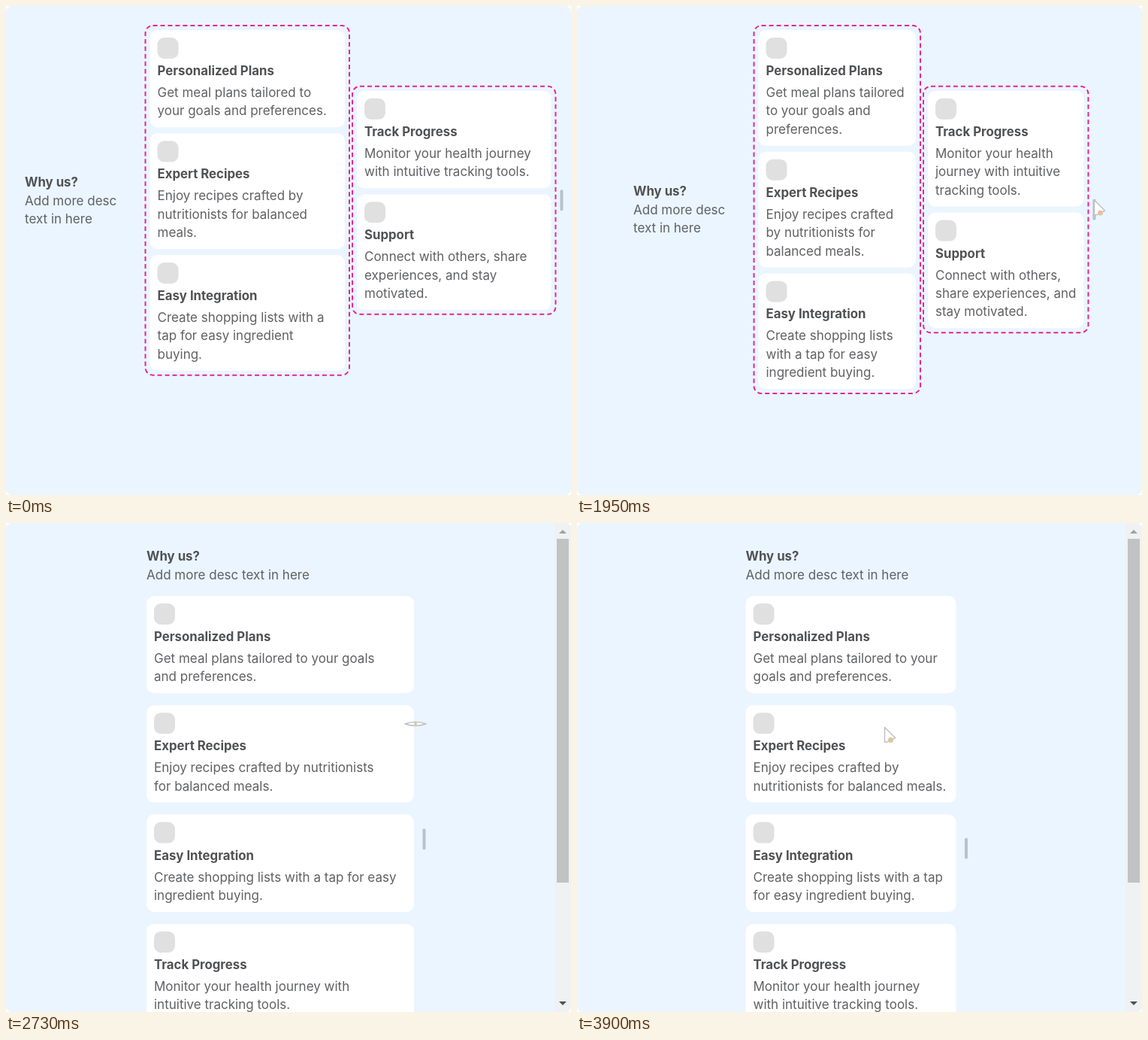
These frames come from a looping animation (752 px wide and 650 px high, 4.03 s). An HTML page:

```html
<!DOCTYPE html>
<html lang="en">
<head>
<meta charset="utf-8">
<title>Responsive cards</title>
<style>
  html, body { margin: 0; width: 100%; height: 100%; overflow: hidden; background: #fff; }
  svg { display: block; width: 752px; height: 650px; }
  text { font: 400 17px Inter, Roboto, sans-serif; fill: #606163; }
  .title { font-size: 16.8px; font-weight: 700; fill: #505153; }
  .card { fill: #fff; }
  .icon { fill: #e0e0e0; }
  .column { fill: none; stroke: #ec2390; stroke-width: 2; }
  .handle { fill: #b8c2cc; }
  .cursor { fill: #fff; stroke: #bfc1c3; stroke-width: 1.5; stroke-linejoin: round; }
  .dot { fill: #e3c3a3; stroke: none; }
</style>
</head>
<body>
<svg id="stage" viewBox="0 0 752 650" xmlns="http://www.w3.org/2000/svg"></svg>
<script>
const LOOP = 4030, LINE = 24.4, PAD = 10, ICON = 28;

// Each card: title, then [smallest text width, line breaks] from wide to narrow.
const CARDS = [
  ['Personalized Plans', [
    [300, 'Get meal plans tailored to your goals|and preferences.'],
    [251, 'Get meal plans tailored to your|goals and preferences.'],
    [225, 'Get meal plans tailored to|your goals and preferences.'],
    [209, 'Get meal plans tailored to|your goals and|preferences.'],
    [0, 'Get meal plans tailored|to your goals and|preferences.']]],
  ['Expert Recipes', [
    [306, 'Enjoy recipes crafted by nutritionists|for balanced meals.'],
    [258, 'Enjoy recipes crafted by|nutritionists for balanced meals.'],
    [202, 'Enjoy recipes crafted by|nutritionists for balanced|meals.'],
    [194, 'Enjoy recipes crafted by|nutritionists for|balanced meals.'],
    [0, 'Enjoy recipes crafted|by nutritionists for|balanced meals.']]],
  ['Easy Integration', [
    [325, 'Create shopping lists with a tap for easy|ingredient buying.'],
    [283, 'Create shopping lists with a tap for|easy ingredient buying.'],
    [253, 'Create shopping lists with a tap|for easy ingredient buying.'],
    [222, 'Create shopping lists with a|tap for easy ingredient|buying.'],
    [207, 'Create shopping lists with|a tap for easy ingredient|buying.'],
    [0, 'Create shopping lists|with a tap for easy|ingredient buying.']]],
  ['Track Progress', [
    [338, 'Monitor your health journey with intuitive|tracking tools.'],
    [263, 'Monitor your health journey with|intuitive tracking tools.'],
    [225, 'Monitor your health journey|with intuitive tracking tools.'],
    [0, 'Monitor your health|journey with intuitive|tracking tools.']]],
  ['Support', [
    [263, 'Connect with others, share|experiences, and stay motivated.'],
    [215, 'Connect with others, share|experiences, and stay|motivated.'],
    [0, 'Connect with others,|share experiences, and|stay motivated.']]]
];

// start, layout, left and right edge, cursor kind, cursor x, y
const STEPS = [
  [0, 'flow', 25, 732],
  [1040, 'flow', 25, 732, 'resize', 743, 265],
  [1300, 'flow', 31, 726, 'resize', 735, 264],
  [1430, 'flow', 41, 716, 'resize', 725, 264],
  [1690, 'flow', 51, 706, 'resize', 713, 264],
  [1820, 'flow', 63, 694, 'resize', 700, 262],
  [1950, 'flow', 75, 681, 'arrow', 688.5, 258],
  [2210, 'grid', 106, 644, 'resize', 650, 266],
  [2340, 'grid', 143, 607.5, 'resize', 616, 267],
  [2600, 'grid', 152, 598.5, 'resize', 580, 267],
  [2730, 'list', 187, 543, 'resize', 545, 267],
  [2860, 'list', 217, 512, 'resize', 522, 267],
  [2990, 'list', 224.5, 504.5, 'arrow', 517.5, 267],
  [3250, 'list', 224.5, 504.5, 'arrow', 510, 267],
  [3380, 'list', 224.5, 504.5, 'arrow', 499, 268],
  [3510, 'list', 224.5, 504.5, 'arrow', 486, 269],
  [3640, 'list', 224.5, 504.5, 'arrow', 471, 270],
  [3770, 'list', 224.5, 504.5, 'arrow', 448, 271],
  [3900, 'list', 224.5, 504.5, 'arrow', 409.5, 271.5]
];

const rect = (cls, x, y, w, h, r, extra = '') =>
  `<rect class="${cls}" x="${x}" y="${y}" width="${w}" height="${h}" rx="${r}" ${extra}/>`;
const text = (x, y, str, cls = '') => `<text class="${cls}" x="${x}" y="${y}">${str}</text>`;

const linesOf = (card, width) =>
  card[1].find(([min]) => width - 2 * PAD >= min)[1].split('|');
const cardHeight = (card, width) => 80.5 + LINE * linesOf(card, width).length;
const sum = list => list.reduce((a, b) => a + b, 0);

// Fits a whole number of dashes around the outline, as a CSS border does.
function dashedBox(x, y, w, h) {
  const r = 10, dash = 6;
  const around = 2 * (w + h) - (8 - 2 * Math.PI) * r;
  const gap = around / Math.round(around / 10) - dash;
  return rect('column', x, y, w, h, r, `stroke-dasharray="${dash} ${gap}"`);
}

function drawCard(card, x, y, width, height = cardHeight(card, width)) {
  const tx = x + PAD;
  return rect('card', x, y, width, height, 10)
    + rect('icon', tx, y + PAD, ICON, ICON, 9)
    + text(tx, y + 60, card[0], 'title')
    + linesOf(card, width).map((s, i) => text(tx, y + 89 + i * LINE, s)).join('');
}

function drawIntro(x, baseline, ...lines) {
  return text(x, baseline, 'Why us?', 'title')
    + lines.map((s, i) => text(x, baseline + 25 + i * LINE, s)).join('');
}

const drawHandle = (x, middle) => rect('handle', x - 2, middle - 14, 4, 28, 2);

function flow(left, right) {
  const inset = 6, gap = 8, top = 26;
  const columns = [
    { x: left + 160.5, end: 457, cards: CARDS.slice(0, 3) },
    { x: 461, end: right - 0.5, cards: CARDS.slice(3) }
  ];
  for (const c of columns) {
    c.width = c.end - c.x - 2 * inset;
    c.heights = c.cards.map(card => cardHeight(card, c.width));
    c.height = sum(c.heights) + gap * (c.cards.length - 1) + 2 * inset;
  }
  const middle = top + columns[0].height / 2;
  let out = drawIntro(left, middle - 18.5, 'Add more desc', 'text in here');
  for (const c of columns) {
    let y = middle - c.height / 2;
    out += dashedBox(c.x, y, c.end - c.x, c.height);
    y += inset;
    c.cards.forEach((card, i) => {
      out += drawCard(card, c.x + inset, y, c.width);
      y += c.heights[i] + gap;
    });
  }
  return out + drawHandle(right + 7.5, middle);
}

function stacked(left, right, perRow) {
  const gap = 16, width = (right - left - gap * (perRow - 1)) / perRow;
  let out = drawIntro(left, 50, 'Add more desc text in here'), y = 97;
  for (let i = 0; i < CARDS.length; i += perRow) {
    const row = CARDS.slice(i, i + perRow);
    const height = Math.max(...row.map(card => cardHeight(card, width)));
    row.forEach((card, k) => {
      out += drawCard(card, left + k * (width + gap), y, width, height);
    });
    y += height + gap;
  }
  return out + drawHandle(right + 13.5, (33 + y - gap) / 2);
}

const scrollbar = () => `<path fill="#f0f1f2" d="M730 0H744Q752 0 752 8V642Q752 650 744 650H730Z"/>
  <path fill="#c1c2c2" d="M733 21h16v457h-16z"/>
  <path fill="#a0a1a2" d="M736 14l5-5 5 5z"/>
  <path fill="#505152" d="M736 636l5 5 5-5z"/>`;

const LAYOUTS = {
  flow,
  grid: (left, right) => stacked(left, right, 2),
  list: (left, right) => stacked(left, right, 1) + scrollbar()
};

const CURSORS = {
  resize: '<path d="M-14 0Q-7-2.5 0-2.5T14 0Q7 2.5 0 2.5T-14 0Z"/><circle class="dot" r="2"/>',
  arrow: '<path d="M0 0V20L5 19 14 14Z"/><circle class="dot" cx="8" cy="17" r="3.5"/>'
};

const stage = document.getElementById('stage');

function draw([, layout, left, right, cursor, x, y]) {
  stage.innerHTML = '<rect width="752" height="650" rx="8" fill="#eaf5ff"/>'
    + LAYOUTS[layout](left, right)
    + (cursor ? `<g class="cursor" transform="translate(${x} ${y})">${CURSORS[cursor]}</g>` : '');
}

let shown, begin;
function tick(now) {
  begin ??= now;
  const t = (now - begin) % LOOP;
  const step = STEPS.findLast(s => s[0] <= t) || STEPS[0];
  if (step !== shown) draw(shown = step);
  requestAnimationFrame(tick);
}
draw(shown = STEPS[0]);
requestAnimationFrame(tick);
</script>
</body>
</html>
```
